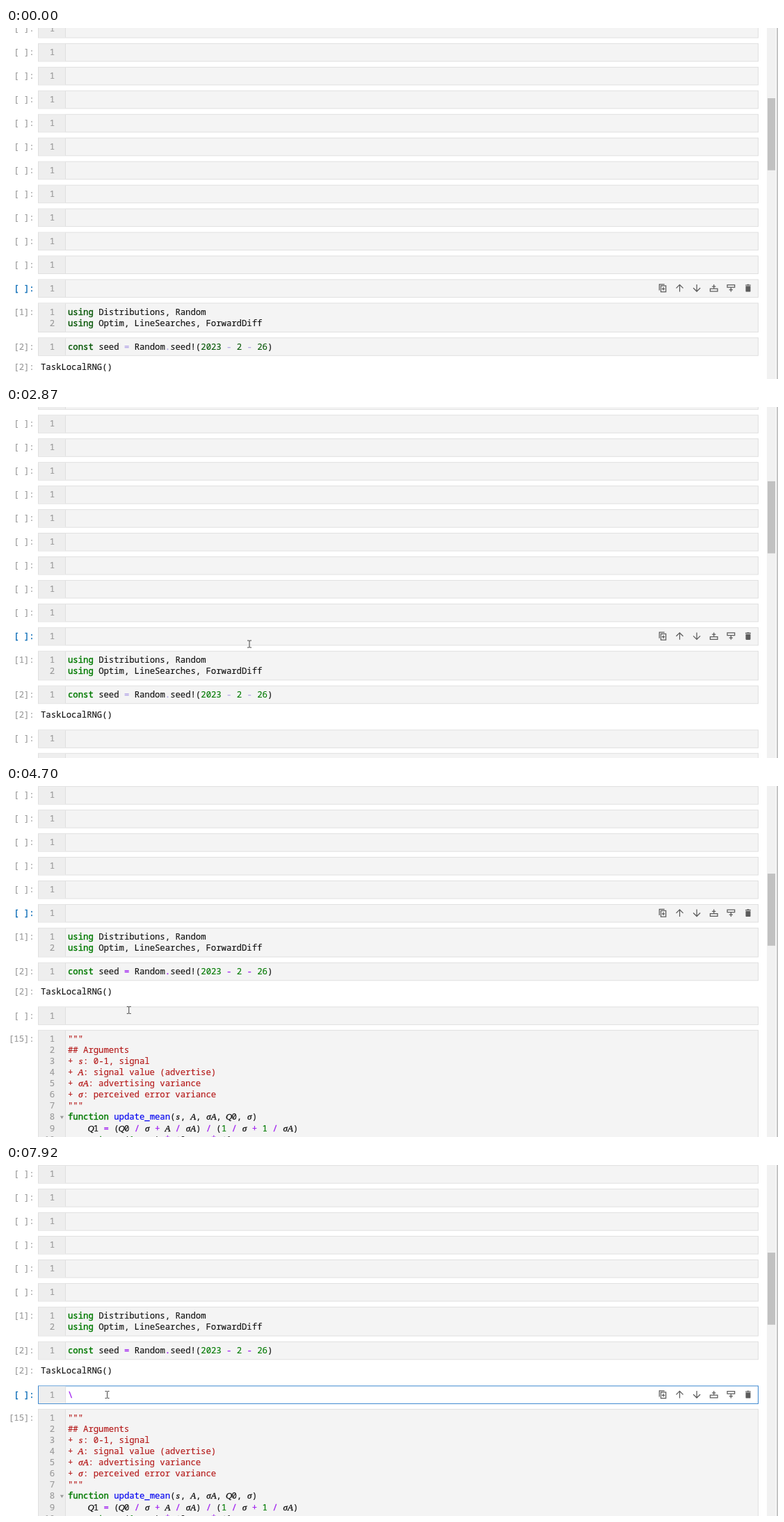
These frames come from a looping animation (1110 px wide and 505 px high, 8 s). An HTML page:

```html
<!DOCTYPE html>
<html lang="en">
<head>
<meta charset="utf-8">
<title>Notebook</title>
<style>
html, body { margin: 0; width: 100%; height: 100%; overflow: hidden; background: #fff; }
svg { display: block; width: 1110px; height: 505px; }
text { font: 12.26px "Noto Sans Mono", "DejaVu Sans Mono", monospace; fill: #141414; stroke: #141414; stroke-width: .15px; white-space: pre; }
.box { fill: #f4f4f4; stroke: #e0e0e0; }
.focused .box { fill: #fff; stroke: #3a86cf; }
.gutter { fill: #eee; }
.edge { fill: #e0e0e0; }
.prompt, .num { fill: #999; stroke: #999; text-anchor: end; }
.active .prompt { fill: #0f6fb8; stroke: #0f6fb8; stroke-width: .4px; }
.kw { fill: var(--kw); stroke: var(--kw); stroke-width: .4px; }
.lit { fill: var(--kw); stroke: var(--kw); }
.op { fill: var(--op); stroke: var(--op); stroke-width: .3px; }
.def { fill: #0000f0; stroke: #0000f0; }
.doc, .doc .var { fill: #b51a1a; stroke: #b51a1a; }
.var { font-family: "Liberation Serif", "Noto Serif", serif; font-style: italic; font-size: 12.8px; text-anchor: middle; stroke-width: .35px; }
.icons { fill: none; stroke: #5c5c5c; stroke-width: 1.25; }
.icons .solid { fill: #5c5c5c; stroke: none; }
</style>
</head>
<body>
<svg id="stage" viewBox="0 0 1110 505"></svg>
<script>
const LOOP = 8000, CHAR = 7.357, LINE = 16.05, ROW = 33.95, CODE_X = 89, BASE = 4.2;
const stage = document.getElementById('stage');

function add(parent, tag, attrs = {}, content) {
  const el = document.createElementNS('http://www.w3.org/2000/svg', tag);
  for (const key in attrs) el.setAttribute(key, attrs[key]);
  if (content !== undefined) el.textContent = content;
  parent.append(el);
  return el;
}
const rect = (p, x, y, width, height, attrs) => add(p, 'rect', { x, y, width, height, ...attrs });
const label = (p, x, y, cls, content) => add(p, 'text', { x, y, class: cls }, content);
const show = (el, on) => el.setAttribute('visibility', on ? 'visible' : 'hidden');

// Syntax colouring: each token starts on its own character column
const TOKEN = /(?<kw>\b(?:using|const|function|return)\b)|(?<def>update_mean)|(?<var>σ|\b[sA]\b|\bQ(?=\d))|(?<lit>(?<!Q)\d+)|(?<op>[=+\-*\/.\\])/g;

function codeLine(parent, y, line, isDoc) {
  const g = add(parent, 'g', isDoc ? { class: 'doc' } : {});
  const put = (col, s, cls) => {
    const lead = s.length - s.trimStart().length;
    if (!s.trim()) return;
    const shift = cls === 'var' ? 0.5 : 0;
    const plain = isDoc && cls !== 'var';
    label(g, CODE_X + (col + lead + shift) * CHAR, y, plain ? 'doc' : cls, s.trim());
  };
  let at = 0;
  for (const m of line.matchAll(TOKEN)) {
    put(at, line.slice(at, m.index), '');
    put(m.index, m[0], Object.keys(m.groups).find(k => m.groups[k]));
    at = m.index + m[0].length;
  }
  put(at, line.slice(at), '');
}

function icons(parent, y) {
  const g = add(parent, 'g', { class: 'icons' });
  const shapes = [
    'M-4.6 3.2V-5.4H2.8M-2.4 -3.3H4.8V5.4H-2.4ZM1.2 -1.1V3.3M-1 1.1H3.4',
    'M0 5.2V-4.6M-5 .2L0 -4.8L5 .2',
    'M0 -5.2V4.6M-5 -.2L0 4.8L5 -.2',
    'M-5.3 1H5.3V4.7H-5.3ZM0 -5.2V1M-2.6 -2.4H2.6',
    'M-5.3 -4.7H5.3V-1H-5.3ZM0 -1V5.2M-2.6 2.4H2.6',
    'M-4 -4.8H-2L-1.4 -5.4H1.4L2 -4.8H4V-3.6H-4ZM-3.5 -2.9H3.5V4.2Q3.5 5.4 2.3 5.4H-2.3Q-3.5 5.4 -3.5 4.2Z'
  ];
  shapes.forEach((d, i) => add(g, 'path', {
    d, class: i === 5 ? 'solid' : '', transform: `translate(${944 + i * 24.6} ${y})`
  }));
  return g;
}

// y is the middle of the first line
function cell(y, prompt, lines = [''], docLines = 0) {
  const g = add(page, 'g');
  const h = 25.5 + (lines.length - 1) * LINE;
  rect(g, 46.5, y - 12.5, 1035, h, { class: 'box' });
  rect(g, 47, y - 12, 38, h - 1, { class: 'gutter' });
  rect(g, 85, y - 12, 1, h - 1, { class: 'edge' });
  label(g, 40.7, y + BASE, 'prompt', `[${prompt}]:`);
  lines.forEach((line, i) => {
    const base = y + BASE + i * LINE;
    label(g, 70, base, 'num', i + 1);
    codeLine(g, base, line, i < docLines);
  });
  return g;
}

const page = add(stage, 'g');
let upper;
for (let i = -1; i <= 10; i++) upper = cell(34.95 + i * ROW, ' ');
const upperIcons = icons(upper, 374.2);

cell(408.4, '1', ['using Distributions, Random', 'using Optim, LineSearches, ForwardDiff']);
cell(458.3, '2', ['const seed = Random.seed!(2023 - 2 - 26)']);
label(page, 40.7, 487.7 + BASE, 'prompt', '[2]:');
label(page, 50, 487.7 + BASE, '', 'TaskLocalRNG()');

const LOWER_Y = 521.9;
const lower = cell(LOWER_Y, ' ');
const lowerIcons = icons(lower, LOWER_Y - 0.2);
const typed = label(lower, CODE_X, LOWER_Y + BASE, 'op', '\\');
const caret = rect(lower, CODE_X, LOWER_Y - 7.4, 1, 16, { fill: '#3f4f66' });

cell(555.4, '15', [
  '"""',
  '## Arguments',
  '+ s: 0-1, signal',
  '+ A: signal value (advertise)',
  '+ σA: advertising variance',
  '+ σ: perceived error variance',
  '"""',
  'function update_mean(s, A, σA, Q0, σ)',
  '    Q1 = (Q0 / σ + A / σA) / (1 / σ + 1 / σA)',
  '    return (1 - s) * Q0 + s * Q1',
  'end'
], 7);
add(page, 'path', { d: 'M77.8 666.2h5.2l-2.6 4.2z', fill: '#999' });

// Scrollbar and window edge
rect(stage, 1094, 0, 13, 505, { fill: '#f1f1f1' });
const thumb = rect(stage, 1095, 101, 11, 103.7, { fill: '#c1c1c1' });
rect(stage, 1108, 0, 2, 505, { fill: '#c4c4c4' });

// Key press display
const keyBox = add(stage, 'g');
rect(keyBox, 541, 467, 29, 38, { fill: '#000', 'fill-opacity': 0.5 });
add(keyBox, 'text', {
  x: 555.5, y: 495, 'text-anchor': 'middle',
  style: 'font: 27px "Open Sans", "Noto Sans", sans-serif; fill: #fff; stroke: none'
}, '\\');

const click = add(stage, 'circle', { cx: 144, cy: 330, r: 9.7, fill: '#ff0', 'fill-opacity': 0.47 });
const pointer = add(stage, 'path', {
  d: 'M-3 -5H-.8L0 -4.4L.8 -5H3M0 -4.6V4.6M-3 5H-.8L0 4.4L.8 5H3',
  fill: 'none', stroke: '#444', 'stroke-width': 1
});

const smooth = p => p * p * (3 - 2 * p);
const easeOut = p => 1 - (1 - p) ** 2;
// start, end, steps, from, to, easing
const moves = [
  [800, 1320, 17, [870, 515], [193.5, 449.5], easeOut],
  [1930, 2300, 11, [193.5, 449.5], [353, 344], smooth],
  [2330, 2440, 4, [353, 344], [350, 341], smooth],
  [3870, 4670, 25, [350, 341], [188, 319.5], smooth],
  [4700, 4880, 7, [188, 319.5], [145.5, 330.5], easeOut]
];

function pointerAt(t) {
  const move = moves.filter(m => t >= m[0]).pop();
  if (!move) return null;
  const [start, end, steps, from, to, ease] = move;
  const k = Math.floor((t - start) / (end - start) * (steps - 1) + 1e-6) + 1;
  const e = ease(Math.min(1, k / steps));
  return from.map((v, i) => v + (to[i] - v) * e);
}

const scrollSteps = [0, 10, 44.6, 110, 172.4, 191.5];
function scrollAt(t) {
  const k = Math.floor((t - 2840) / 30) + 1;
  return scrollSteps[Math.max(0, Math.min(5, k))];
}

function draw(t) {
  const scroll = scrollAt(t);
  page.setAttribute('transform', `translate(0 ${-scroll})`);
  thumb.setAttribute('y', 101 + scroll * 0.131);
  stage.style.setProperty('--kw', t < 2840 ? '#085808' : '#007a00');
  stage.style.setProperty('--op', t < 2900 ? '#b3a5e6' : '#a020f0');

  const editing = t >= 5600;
  upper.setAttribute('class', editing ? '' : 'active');
  lower.setAttribute('class', editing ? 'active focused' : '');
  show(upperIcons, !editing);
  show(lowerIcons, editing);

  const hasText = t >= 7090;
  show(typed, hasText);
  caret.setAttribute('x', CODE_X + (hasText ? 7 : 0));
  show(caret, editing && (t < 6090 || (t >= 6600 && t < 7620)));
  show(keyBox, t >= 7060 && t < 7920);
  show(click, t >= 5050 && t < 5200);

  const pos = pointerAt(t);
  show(pointer, pos);
  if (pos) pointer.setAttribute('transform', `translate(${pos})`);
}

const begin = performance.now();
function tick() {
  draw((performance.now() - begin) % LOOP);
  requestAnimationFrame(tick);
}
tick();
</script>
</body>
</html>
```
